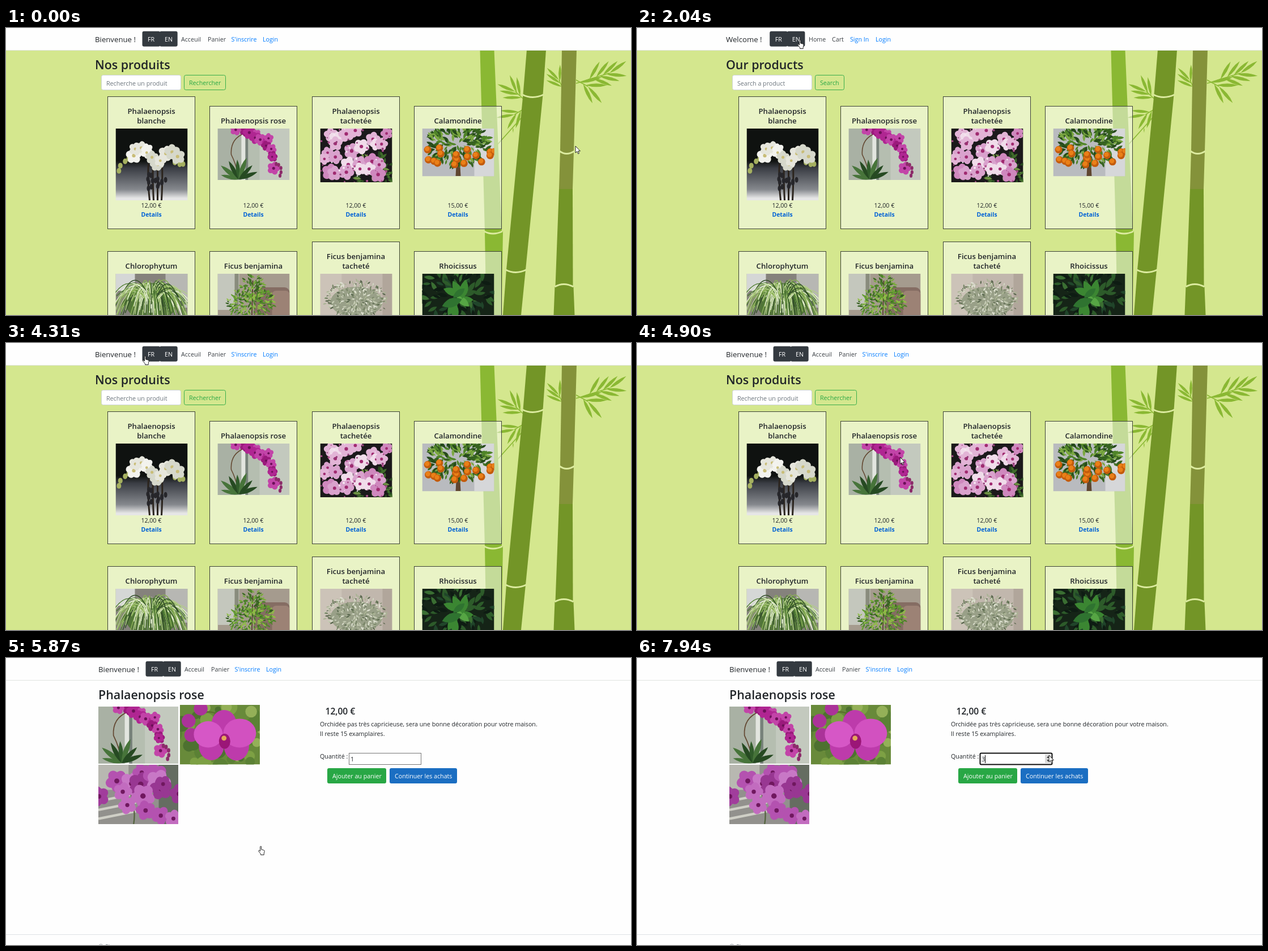
Write an HTML page that moves like this. It is 1103x508 px and loops after 8000 ms.

```html
<!DOCTYPE html>
<html lang="fr">
<head>
<meta charset="utf-8">
<style>
html, body { margin: 0; width: 100%; height: 100%; overflow: hidden; background: #fff }
svg { display: block }
text { font-family: "Open Sans", "Noto Sans", sans-serif; white-space: pre }
</style>
</head>
<body>
<svg id="stage" width="1103" height="508" viewBox="0 0 1103 508">
  <defs><linearGradient id="dusk" x2="0" y2="1">
    <stop offset=".45" stop-color="#0f1210"/><stop offset=".55" stop-color="#3a3d44"/>
    <stop offset=".85" stop-color="#85888d"/><stop offset=".97" stop-color="#e6e6e6"/>
  </linearGradient></defs>
  <g id="shop"></g><g id="product"></g><g id="live"></g>
</svg>
<script>
const INK = '#212529', DARK = '#343a40', BLUE = '#007bff', GREEN = '#28a745';
const LOOP = 8000;
const $ = id => document.getElementById(id);

// Seeded random numbers keep the plants identical on every load.
let seed = 7;
const rnd = () => (seed = seed * 16807 % 2147483647) / 2147483647;
const pick = list => list[Math.floor(rnd() * list.length)];
const jitter = size => (rnd() - .5) * size;
const times = (n, draw) => Array.from({ length: n }, (_, i) => draw(i)).join('');

// Point at p (0 to 1) on the curve from a to c, bent towards b.
const curve = ([a, b, c], p) => [0, 1].map(k => (1 - p) ** 2 * a[k] + 2 * p * (1 - p) * b[k] + p * p * c[k]);

const text = (x, y, s, fill = INK, size = 10.7, weight = 400, anchor = 'start') =>
  `<text x="${x}" y="${y}" fill="${fill}" font-size="${size}" font-weight="${weight}" text-anchor="${anchor}">${s}</text>`;
const heading = (x, s) => text(x, 73, s, INK, 21.4, 600);
const rect = (x, y, w, h, fill, more = '') =>
  `<rect x="${x}" y="${y}" width="${w}" height="${h}" fill="${fill}" ${more}/>`;
const path = (d, fill, more = '') => `<path d="${d}" fill="${fill}" ${more}/>`;
const line = (d, color, width) => path(d, 'none', `stroke="${color}" stroke-width="${width}"`);
const dot = (x, y, r, fill, ry = r) => `<ellipse cx="${x}" cy="${y}" rx="${r}" ry="${ry}" fill="${fill}"/>`;

function leaf(x, y, angle, length, fill, fat = .16) {
  const dx = length * Math.cos(angle), dy = length * Math.sin(angle);
  const mx = x + dx / 2, my = y + dy / 2;
  return path(`M${x} ${y}Q${mx + dy * fat} ${my - dx * fat} ${x + dx} ${y + dy}Q${mx - dy * fat} ${my + dx * fat} ${x} ${y}`, fill);
}

function flower(x, y, r, fill, core) {
  const turn = rnd() * 72;
  return times(5, i => `<ellipse cx="${x}" cy="${y - r * .48}" rx="${r * .46}" ry="${r * .52}" fill="${fill}" transform="rotate(${turn + i * 72} ${x} ${y})"/>`)
    + dot(x, y, r * .22, core);
}

const flowers = (size, colors, core) => (x, y) => flower(x, y, size + jitter(size * .4), pick(colors), core);

function scatter(n, cx, cy, rx, ry, draw) {
  return times(n, () => {
    const a = rnd() * 2 * Math.PI, d = Math.sqrt(rnd());
    return draw(cx + rx * d * Math.cos(a), cy + ry * d * Math.sin(a), a);
  });
}

const along = (n, bend, loose, draw) => times(n, i => {
  const [x, y] = curve(bend, i / (n - 1));
  return draw(x + jitter(loose), y + jitter(loose));
});

const grid = (cols, rows, w, h, draw) => times(cols * rows, i =>
  draw((i % cols + .5 + jitter(.9)) * w / cols, (Math.floor(i / cols) + .5 + jitter(.8)) * h / rows));

const foliage = (n, cx, cy, rx, ry, colors, size) =>
  scatter(n, cx, cy, rx, ry, (x, y, a) => leaf(x, y, a + jitter(2), size * (.7 + rnd() * .6), pick(colors), .35));

const spots = (n, h, size, colors) =>
  scatter(n, 63, h / 2, 75, h * .6, (x, y) => dot(x, y, size * (.5 + rnd()), pick(colors)));

// Pictures are drawn 127 units wide.
const art = {
  white() {
    const petals = flowers(12, ['#e6e6dc', '#d6d8cb', '#f3f3ee'], '#c9bd78');
    const bud = (x, y) => dot(x, y, 4, '#a5b060', 5);
    return rect(0, 0, 127, 127, 'url(#dusk)')
      + times(4, i => line(`M${60 + i * 7} 127Q${56 + i * 9} 90 ${58 + i * 8} 62`, '#2b241d', 3))
      + scatter(14, 70, 95, 20, 22, (x, y) => dot(x, y, 3, '#26262a', 5))
      + along(5, [[28, 48], [14, 54], [6, 76]], 5, bud) + along(3, [[104, 60], [112, 68], [120, 62]], 3, bud)
      + along(7, [[32, 44], [52, 22], [70, 62]], 9, petals) + along(5, [[72, 66], [88, 36], [106, 46]], 9, petals);
  },

  rose() {
    const stem = [[36, 6], [96, 0], [104, 66]];
    return rect(0, 0, 127, 91, '#c3c9be') + rect(0, 0, 42, 91, '#a9b1a4')
      + rect(42, 0, 7, 91, '#e2e5df') + rect(49, 0, 5, 91, '#77827a') + rect(54, 0, 20, 91, '#b5beb0')
      + line('M37 88Q34 66 24 46Q22 18 48 8', '#634832', 1.6)
      + times(7, i => leaf(37, 90, -2.9 + i * .42, 32 + rnd() * 10, pick(['#315c2b', '#47743a', '#264a22']), .2))
      + along(15, stem, 14, flowers(10, ['#b02692', '#9b1a7c', '#c244a8'], '#6c1058'))
      + along(5, [[104, 62], [116, 68], [112, 82]], 4, (x, y) => dot(x, y, 2.6, '#8c2b69', 3.6));
  },

  spotted: () => rect(0, 0, 127, 95, '#1b191b')
    + foliage(50, 100, 75, 36, 26, ['#3f6b2b', '#6d9142', '#274a20'], 12)
    + grid(6, 4, 120, 90, flowers(13, ['#e2b4d6', '#cf88be', '#f0dcea', '#d9a2cd'], '#a02a70'))
    + spots(60, 95, 1.4, ['#b0508f', '#f4e6f0', '#94407a']),

  orange: () => rect(0, 0, 127, 84.5, '#b9bbbf') + rect(92, 0, 35, 84.5, '#d6d7d9')
    + path('M59 84L61 50H66L68 84Z', '#5f4630')
    + foliage(240, 63, 28, 50, 34, ['#36621f', '#4f8428', '#7ca842', '#264a1c'], 12)
    + along(18, [[6, 42], [62, 56], [122, 50]], 30, (x, y) => dot(x, y, 6.5, '#c45c0c') + dot(x - 1, y - 1.5, 4.2, '#ea8018')),

  spider: () => rect(0, 0, 127, 127, '#85827c') + rect(0, 0, 34, 30, '#d5d7d6') + rect(88, 0, 39, 60, '#b7b7b3')
    + dot(63, 50, 46, '#53743a', 34)
    + times(190, () => {
      const side = rnd() * 2 - 1;
      return line(`M${63 + side * 12} ${30 + rnd() * 20}Q${63 + side * 40} ${rnd() * 40 - 18} ${63 + side * 68} ${34 + rnd() * 50}`,
        pick(['#e4eed0', '#89af55', '#4d7932', '#b2cd86', '#34502a']), 1.5);
    }),

  ficus: () => rect(0, 0, 127, 127, '#a59b8e') + rect(0, 0, 38, 64, '#c4c7bd') + rect(30, 0, 7, 80, '#898c7d')
    + rect(64, 24, 63, 60, '#856d63', 'rx="9"') + rect(96, 30, 31, 60, '#9c8275', 'rx="7"')
    + line('M60 90L62 12', '#594530', 2)
    + foliage(90, 61, 28, 18, 26, ['#79ac3b', '#4d8429', '#3d6c22'], 7)
    + foliage(230, 59, 52, 40, 26, ['#659f30', '#8fbd45', '#345e20', '#4d8429'], 7),

  pale: () => rect(0, 0, 127, 127, '#c1b7ad') + rect(0, 0, 38, 127, '#ccc3b8') + rect(110, 0, 17, 127, '#b1a69b')
    + dot(64, 50, 46, '#99a088', 27)
    + foliage(320, 64, 46, 54, 32, ['#dfe2d2', '#aab394', '#778566', '#c6ccb4', '#55634a'], 6),

  dark: () => rect(0, 0, 127, 127, '#152417')
    + foliage(90, 63, 36, 64, 40, ['#20452a', '#2d5b2a', '#0e1c13', '#3a6e32'], 19)
    + times(9, i => leaf(62 + jitter(20), 42 + jitter(14), i * .7, 26 + rnd() * 14, pick(['#3b8632', '#56a544', '#2f7330']), .42)),

  close: () => rect(0, 0, 127, 95, '#688a3a') + spots(50, 95, 9, ['#7da044', '#4d7130', '#94b058', '#5b8135'])
    + line('M16 28Q34 2 64 16M18 48L42 32', '#596e2b', 2)
    + along(3, [[33, 6], [2, 24], [18, 48]], 0, (x, y) => dot(x, y, 11, '#ab3399'))
    + times(3, i => dot(70 + 23 * Math.sin(i * 2.1), 54 - 23 * Math.cos(i * 2.1), 20, '#bd3bab', 23))
    + dot(45, 47, 23, '#d657c6', 21) + dot(95, 45, 26, '#d251c0', 23)
    + dot(71, 58, 9, '#9b1677', 12) + dot(70, 53, 4, '#e3a75a'),

  cluster: () => rect(0, 0, 127, 95, '#92918d') + rect(0, 0, 48, 40, '#b8b8b1') + rect(96, 0, 31, 95, '#656d61')
    + times(3, i => line(`M0 ${58 + i * 14}L60 ${46 + i * 14}`, '#cfcfc6', 4))
    + line('M56 95Q62 60 40 22', '#52633c', 2)
    + along(9, [[40, 18], [80, 22], [122, 42]], 22, flowers(17, ['#b452b0', '#c878c6', '#983792'], '#70185f'))
    + along(7, [[12, 50], [60, 56], [112, 76]], 24, flowers(17, ['#b452b0', '#c26cbf', '#a13d9c'], '#70185f'))
};

function photo(name, x, y, w, h) {
  seed = 1000 + name.length * 97;
  return `<svg x="${x}" y="${y}" width="${w}" height="${h}" viewBox="0 0 127 ${h * 127 / w}">${art[name]()}</svg>`;
}

// A cane section tapers from one centre and width to another, with a pale joint at its foot.
const cane = (x, y, w, x2, y2, w2, fill, joint) =>
  path(`M${x - w / 2} ${y}H${x + w / 2}L${x2 + w2 / 2} ${y2}H${x2 - w2 / 2}Z`, fill)
  + (joint ? line(`M${x2 - w2 / 2 - 1} ${y2}q${w2 / 2} ${joint} ${w2 + 2} 0`, '#dcebA0', 3) : '');

function twig(x, y, angle, length, n, size) {
  const fill = '#8ab833', dx = Math.cos(angle), dy = Math.sin(angle);
  return line(`M${x} ${y}l${length * dx} ${length * dy}`, fill, 1.6) + times(n, i => {
    const d = length * (.4 + .6 * i / (n - 1)), spread = (i % 2 ? 1 : -1) * (.75 - .5 * i / n);
    return leaf(x + d * dx, y + d * dy, angle + spread, size, fill);
  });
}

function bamboo() {
  const light = '#8ab833', deep = '#739527', tinted = '#84923a';
  return cane(861, 360, 32, 861, 508, 27, light) + cane(849, 39, 25, 860, 360, 30, light, 8)
    + twig(1006, 98, -.3, 62, 7, 36) + twig(1006, 92, .5, 24, 4, 38) + twig(985, 112, -2, 22, 5, 30)
    + twig(918, 130, -2.4, 26, 5, 34) + twig(916, 142, 2.6, 22, 4, 32) + twig(914, 154, 2.3, 72, 2, 10)
    + cane(900, 428, 34, 893, 508, 32, deep) + cane(930, 118, 35, 900, 428, 34, deep, 9) + cane(936, 39, 34, 930, 118, 35, deep, 9)
    + cane(985, 458, 33, 985, 508, 37, deep) + cane(988, 285, 24, 985, 458, 31, deep, -9)
    + cane(990, 218, 24, 988, 285, 24, tinted) + cane(994, 39, 26, 990, 218, 24, tinted, 9);
}

const plants = [
  ['Phalaenopsis|blanche', 'white', 127, '12'], ['Phalaenopsis rose', 'rose', 91, '12'],
  ['Phalaenopsis|tachetée', 'spotted', 95, '12'], ['Calamondine', 'orange', 84.5, '15'],
  ['Chlorophytum', 'spider', 127], ['Ficus benjamina', 'ficus', 127],
  ['Ficus benjamina|tacheté', 'pale', 127], ['Rhoicissus', 'dark', 127]
];

function card([title, name, h, price], i) {
  const x = Math.round(179 + i % 4 * 180.3) + .5, mid = x + 77, y = i < 4 ? 178 : 435;
  const rows = title.split('|'), top = y - 22.5 - 17 * rows.length;
  return rect(x, top, 154, y + 177.5 - top, '#fff', 'fill-opacity=".5" stroke="#3c4136"')
    + rows.map((s, k) => text(mid, y - 9 - 17 * (rows.length - 1 - k), s, INK, 13.2, 600, 'middle')).join('')
    + photo(name, x + 14, y, 127, h)
    + (price ? text(mid, 317.5, price + ',00 €', INK, 10.7, 400, 'middle') + details(mid, '#0062d6') : '');
}

const details = (x, fill) => text(x, 334, 'Details', fill, 10.4, 700, 'middle');

const bar = rect(0, 0, 1103, 39, '#fefefe') + rect(0, 39, 1103, 1, '#dfe3e0');

$('shop').innerHTML = rect(0, 0, 1103, 508, '#d4e78e') + bamboo() + plants.map(card).join('') + bar
  + rect(168.5, 83.5, 140, 26, '#fff', 'rx="3" stroke="#ced4da"');

$('product').innerHTML = rect(0, 0, 1103, 508, '#fefefe') + bar + heading(163, 'Phalaenopsis rose')
  + photo('rose', 163, 86, 141, 101) + photo('close', 307, 83, 141, 105.5) + photo('cluster', 163, 189, 141, 105)
  + text(563.5, 99.5, '12,00 €', INK, 15.6, 600)
  + text(554, 121, 'Orchidée pas très capricieuse, sera une bonne décoration pour votre maison.')
  + text(554, 138, 'Il reste 15 examplaires.') + text(554, 178, 'Quantité :')
  + rect(567, 195, 104, 27, GREEN, 'rx="3"') + text(576, 213, 'Ajouter au panier', '#fff')
  + rect(0, 489, 1103, 1, '#dee2e6') + text(163, 515, '© Sh', '#6c757d');

const words = {
  fr: { hello: 'Bienvenue !', group: 240.5, links: [[309, 'Acceuil'], [356, 'Panier'], [397.5, 'S\'inscrire'], [453, 'Login']],
    title: 'Nos produits', hint: 'Recherche un produit', find: 'Rechercher', findWidth: 73 },
  en: { hello: 'Welcome !', group: 234.2, links: [[303, 'Home'], [344, 'Cart'], [376, 'Sign In'], [421, 'Login']],
    title: 'Our products', hint: 'Search a product', find: 'Search', findWidth: 51 }
};

const nav = (w, hover) => text(157, 24.5, w.hello, INK, 13.2)
  + ['FR', 'EN'].map((s, i) => rect(w.group + i * 30.5, 5.7, 31.7, 27, hover == s ? '#1f2327' : DARK, 'rx="3"')
    + text(w.group + 15.5 + i * 31, 23.5, s, '#fff', 10.7, 400, 'middle')).join('')
  + w.links.map(([x, s], i) => text(x, 23.5, s, i < 2 ? '#3a3f44' : BLUE)).join('');

const searchBar = w => heading(157, w.title) + text(177, 101.5, w.hint, '#6c757d')
  + rect(314.5, 83.5, w.findWidth, 26, 'none', `rx="3" stroke="${GREEN}" stroke-width=".9"`) + text(323, 101, w.find, GREEN);

const within = (t, a, b) => t >= a && t < b;

// Pointer moves: start and end time, number of jumps, and the curve followed.
const moves = [
  { from: 460, to: 730, jumps: 3, way: [[1005, 209], [971, 242], [850, -20]] },
  { from: 1010, to: 1440, jumps: 4, way: [[830, -20], [480, 30], [281, 27]] },
  { from: 1600, to: 2040, jumps: 4, way: [[281, 27], [284, 24], [283, 20]] },
  { from: 2480, to: 2780, jumps: 3, way: [[283, 20], [262, 18], [241, 22]] },
  { from: 4450, to: 5320, jumps: 7, way: [[241, 22], [553, 190], [457, 322]] },
  { from: 5450, to: 5600, jumps: 2, way: [[457, 322], [450, 330], [445, 332]] },
  { from: 6590, to: 7390, jumps: 7, way: [[445, 332], [760, 190], [727, 172]] }
];

function pointerAt(t) {
  const move = moves.findLast(m => m.from <= t);
  if (!move) return moves[0].way[0];
  const { from, to, jumps, way } = move;
  const done = 1 + Math.floor((t - from) / (to - from) * (jumps - 1));
  return curve(way, Math.min(1, done / jumps));
}

const shapes = {
  arrow: 'M0 0V12L2.8 9.4L4.7 13.7L6.5 12.9L4.7 8.8H8.4Z',
  hand: 'M3.6 2Q4.6 -.2 5.7 2V7L9.6 8Q11.4 8.5 11.2 10.4L10.2 14V16.5H4.6V14.8L1 10.4Q.2 8.6 1.6 8.3L3.6 10Z'
};

function pointer(t) {
  const hand = within(t, 1440, 4450) || within(t, 5450, 6590);
  return path(shapes[hand ? 'hand' : 'arrow'], '#fff', `stroke="#111" stroke-width=".9" transform="translate(${pointerAt(t)})"`);
}

function quantity(t) {
  const focus = t >= 7660, n = t >= 7940 ? 3 : focus ? 2 : 1;
  const [x, y] = pointerAt(t), overField = within(x, 605, 733) && within(y, 168, 189);
  const overButton = within(x, 677, 796) && within(y, 195, 222);
  return rect(605.5, 168.5, 127, 20, '#fff', focus ? 'rx="2" stroke="#101010" stroke-width="2"' : 'stroke="#767676"')
    + text(608, 183, n) + (focus ? rect(614, 172, 1, 14, '#000') : '')
    + (overField ? rect(720, 171, 11, 15, '#dadada') + path('M723 177L725.5 173.5L728 177ZM723 180H728L725.5 183.5Z', '#444') : '')
    + rect(677, 195, 119, 27, overButton ? '#1259a8' : '#1b6ec2', 'rx="3"')
    + text(686, 213, 'Continuer les achats', '#fff');
}

function shopView(t) {
  const w = within(t, 1900, 3590) ? words.en : words.fr;
  const hover = within(t, 1440, 1900) ? 'EN' : within(t, 2630, 3590) ? 'FR' : '';
  const link = t >= 5450 ? details(436.5, '#0a4a94') + rect(419, 335, 36, 1, '#0a4a94') : '';
  return nav(w, hover) + searchBar(w) + link;
}

const start = performance.now();
function frame() {
  const t = (performance.now() - start) % LOOP, shop = t < 5870;
  $('shop').style.display = shop ? '' : 'none';
  $('product').style.display = shop ? 'none' : '';
  $('live').innerHTML = (shop ? shopView(t) : `<g transform="translate(6 0)">${nav(words.fr)}</g>` + quantity(t)) + pointer(t);
  requestAnimationFrame(frame);
}
frame();
</script>
</body>
</html>
```
